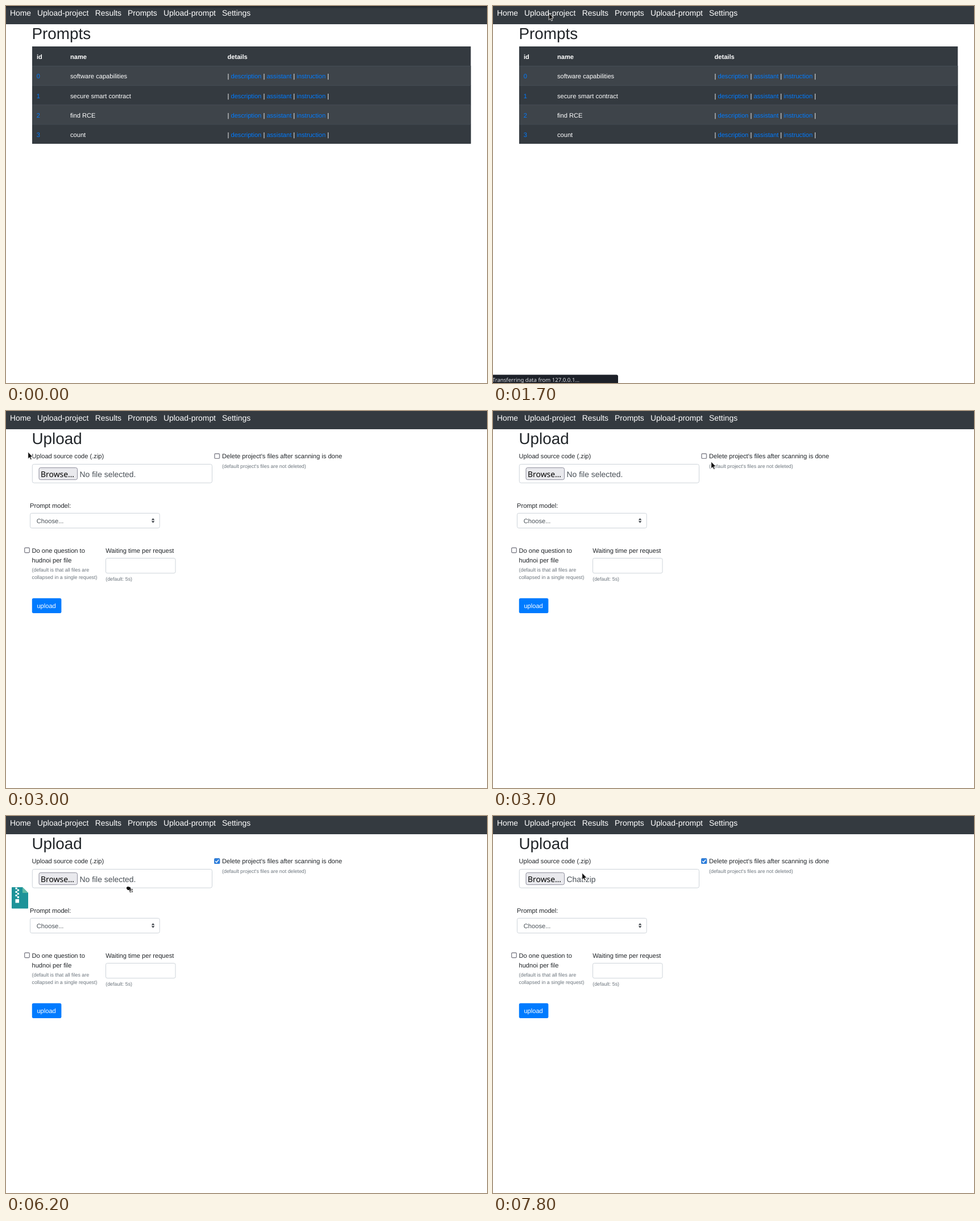
An HTML page that plays this animation: 846 px wide and 662 px high, repeating every 8 s.

```html
<!DOCTYPE html>
<html lang="en">
<head>
<meta charset="utf-8">
<title>Prompt scanner</title>
<style>
  html, body { margin: 0; width: 100%; height: 100%; overflow: hidden; background: #fff; }
  svg { display: block; width: 846px; height: 662px; }
  text { font: 11.13px "Liberation Sans", Arial, sans-serif; fill: #212529; text-rendering: geometricPrecision; white-space: pre; }
  .title { font-size: 27.82px; }
  .large { font-size: 13.91px; }
  .small { font-size: 8.9px; fill: #6c757d; }
  .bold { font-weight: bold; }
  .white { fill: #fff; }
  .gray { fill: #495057; }
  .link { fill: #007bff; }
  .browse { font-family: "Noto Sans", sans-serif; fill: #000; }
  .status { font: 9.6px "Noto Sans", sans-serif; fill: #dcdfe4; }
  .field { fill: #fff; stroke: #ced4da; }
  .box { fill: #fff; stroke: #85858f; stroke-width: 1.4; }
</style>
</head>
<body>
<svg viewBox="0 0 846 662">
  <defs>
    <linearGradient id="shade" x2="0" y2="1">
      <stop stop-color="#20252b"/>
      <stop offset="1" stop-color="#343a40"/>
    </linearGradient>
  </defs>

  <rect width="846" height="32" fill="#343a40"/>
  <rect id="navShade" width="846" height="5" fill="url(#shade)"/>
  <g id="nav"></g>

  <g id="prompts">
    <text class="title" x="45.5" y="58">Prompts</text>
    <rect x="46" y="71" width="771.5" height="170.7" fill="#343a40"/>
    <g id="rows"></g>
    <text class="bold white" x="54" y="92.6">id</text>
    <text class="bold white" x="113" y="92.6">name</text>
    <text class="bold white" x="389.5" y="92.6">details</text>
  </g>

  <g id="upload">
    <text class="title" x="45.5" y="58">Upload</text>

    <text x="45.5" y="83.3">Upload source code (.zip)</text>
    <rect class="field" x="46.3" y="93.5" width="316.2" height="32.7" rx="3"/>
    <rect x="58" y="99.6" width="67.5" height="21" rx="2.8" fill="#e9e9ed" stroke="#8f8f9d"/>
    <text class="large browse" x="61" y="115.6">Browse…</text>
    <text id="fileName" class="large gray" x="129.5" y="115.5"></text>

    <rect id="deleteBox" class="box" x="366.9" y="75" width="8.6" height="8.4" rx="1.4"/>
    <g id="deleteTick">
      <rect id="tickFill" x="366.2" y="74.3" width="10" height="9.8" rx="1.6"/>
      <path d="M368.3 79.4l2 2 3.8-4.7" fill="none" stroke="#fff" stroke-width="1.5"/>
    </g>
    <text x="380" y="83.3">Delete project's files after scanning is done</text>
    <text class="small" x="380" y="100">(default project's files are not deleted)</text>

    <text x="42" y="169.7">Prompt model:</text>
    <rect class="field" x="42.5" y="179.5" width="227.7" height="26" rx="2.8"/>
    <text class="gray" x="53.8" y="196.6">Choose...</text>
    <path d="M255.8 191.6l2.8-3.3 2.8 3.3zM255.8 193.2l2.8 3.3 2.8-3.3z" fill="#343a40"/>

    <rect class="box" x="32.7" y="240.3" width="8.6" height="8.4" rx="1.4"/>
    <text x="45.5" y="248.8">Do one question to</text>
    <text x="45.5" y="265.5">hudnoi per file</text>
    <text class="small" x="45.5" y="282">(default is that all files are</text>
    <text class="small" x="45.5" y="295.3">collapsed in a single request)</text>

    <text x="175.2" y="248.8">Waiting time per request</text>
    <rect class="field" x="175.5" y="258.5" width="122.5" height="26.3" rx="2.8"/>
    <text class="small" x="175.2" y="297.5">(default: 5s)</text>

    <rect x="45.8" y="328.7" width="51.6" height="26.4" rx="2.8" fill="#007bff"/>
    <text class="white" x="54.4" y="345.8">upload</text>
  </g>

  <g id="status">
    <path id="statusBar" fill="#1d2129"/>
    <text id="statusText" class="status" x="-1.2" y="660"></text>
  </g>

  <g id="zip">
    <path d="M0 1q0-1 1-1h18l10 10v26.500q0 1-1 1H1q-1 0-1-1z" fill="#1d9399"/>
    <path d="M19 0l10 10H19z" fill="#62bca7"/>
    <g id="teeth" fill="#fff"><rect x="6.500" y="21" width="6.500" height="6.500"/></g>
  </g>

  <path id="arrow" d="M.7 .9V13L3.400 10.500 5.300 14.600 7.300 13.700 5.500 9.800 9 9.500Z"
        fill="#111" stroke="#fff" stroke-width=".8"/>
  <path id="hand" d="M3 1.500q1-1.500 2 0v4l5 1.200q1.200.4 1 1.800l-.7 5H4.500L.7 9q0-1.700 2.300-.8z"
        fill="#111" stroke="#fff" stroke-width=".8"/>
  <g id="grab">
    <path d="M1 3Q1 1 2.500 1.500 3.500 0 4.500 1.500 6 .8 6.500 2 8.500 2 8.300 4L7.300 7H3L1 4.500z" fill="#111"/>
    <path d="M6.500 5.500h5v5h-5z" fill="#fff" stroke="#222" stroke-width="1" stroke-dasharray="3 1"/>
    <path d="M7.800 6.800l2.400 2.400m-2.400-.2V6.800H10" fill="none" stroke="#222" stroke-width=".9"/>
  </g>
</svg>

<script>
const LOOP = 8000;
const $ = id => document.getElementById(id);

$("nav").innerHTML = [
  ["Home", 7], ["Upload-project", 55], ["Results", 156.7],
  ["Prompts", 214], ["Upload-prompt", 277], ["Settings", 380]
].map(([label, x]) => `<text class="large white" x="${x}" y="17.300">${label}</text>`).join("");

const details = ["description", "assistant", "instruction"]
  .map(word => `| <tspan class="link">${word}</tspan> `).join("") + "|";

$("rows").innerHTML = ["software capabilities", "secure smart contract", "find RCE", "count"]
  .map((name, i) => {
    const top = 105.4 + 34.1 * i, base = top + 22;
    return `<rect x="46" y="${top}" width="771.5" height="34.1" fill="${i % 2 ? "#343a40" : "#3e444a"}"/>
      <rect x="46" y="${top - 0.4}" width="771.5" height="1" fill="#454d55"/>
      <text class="link" x="53.8" y="${base}">${i}</text>
      <text class="white" x="113" y="${base}">${name}</text>
      <text class="white" x="389.5" y="${base}">${details}</text>`;
  }).join("");

for (let i = 0; i < 6; i++) {
  $("teeth").innerHTML +=
    `<rect x="${i % 2 ? 9.8 : 6.5}" y="${0.6 + i * 3.1}" width="3.2" height="3.1"/>`;
}

// Each track holds its value from the given time until the next entry.
const pointers = [
  [0, null],
  [400, "arrow", 4, 150], [500, "arrow", 20, 100], [600, "arrow", 45, 55],
  [700, "hand", 80, 20], [800, "hand", 106, 16], [900, "hand", 102, 14], [1000, "hand", 96, 12],
  [1500, "arrow", 97.500, 11.500], [1900, null],
  [3000, "arrow", 38, 71], [3100, "arrow", 54, 71],
  [3300, "arrow", 230, 76], [3400, "arrow", 467, 97], [3500, "arrow", 389, 91],
  [3700, "arrow", 383, 88], [3800, "arrow", 374, 85], [3900, "arrow", 368, 83],
  [4400, "arrow", 239, 86], [4500, null],
  [6200, "grab", 211, 123], [6400, "grab", 498, 158], [6600, "grab", 287, 110],
  [6800, "grab", 155, 85], [7000, "grab", 152, 93], [7100, "grab", 153, 95],
  [7500, null], [7800, "arrow", 156, 99]
];

const statuses = [
  [0, ""],
  [700, "127.0.0.1:5000/upload", 106],
  [1400, "Waiting for 127.0.0.1…", 220],
  [1600, "Transferring data from 127.0.0.1…", 220],
  [1900, "Read 127.0.0.1", 220],
  [2000, ""]
];

const at = (track, t) => track.findLast(entry => entry[0] <= t);
const show = (id, on) => $(id).setAttribute("display", on ? "inline" : "none");
const place = (id, x, y) => $(id).setAttribute("transform", `translate(${x} ${y})`);

function draw(t) {
  const uploading = t >= 1900;
  show("navShade", t < 1400);
  show("prompts", !uploading);
  show("upload", uploading);
  show("deleteTick", t >= 4100);
  $("tickFill").setAttribute("fill", t < 4400 ? "#0a5bc0" : "#2a7ddc");
  $("fileName").textContent = t < 7500 ? "No file selected." : "Chat.zip";

  const [, message, width] = at(statuses, t);
  show("status", message);
  if (message) {
    $("statusText").textContent = message;
    $("statusBar").setAttribute("d", `M0 647.500H${width - 3}q3 0 3 3V662H0z`);
  }

  const [, kind, x, y] = at(pointers, t);
  for (const id of ["arrow", "hand", "grab"]) show(id, id === kind);
  if (kind) place(kind, x, y);

  // The dragged file trails behind while it enters the page.
  show("zip", kind === "grab");
  if (kind === "grab") place("zip", t < 6400 ? 10 : x + 18, t < 6400 ? 125 : y + 8);
}

const start = performance.now();
function tick() {
  draw((performance.now() - start) % LOOP);
  requestAnimationFrame(tick);
}
tick();
</script>
</body>
</html>
```
